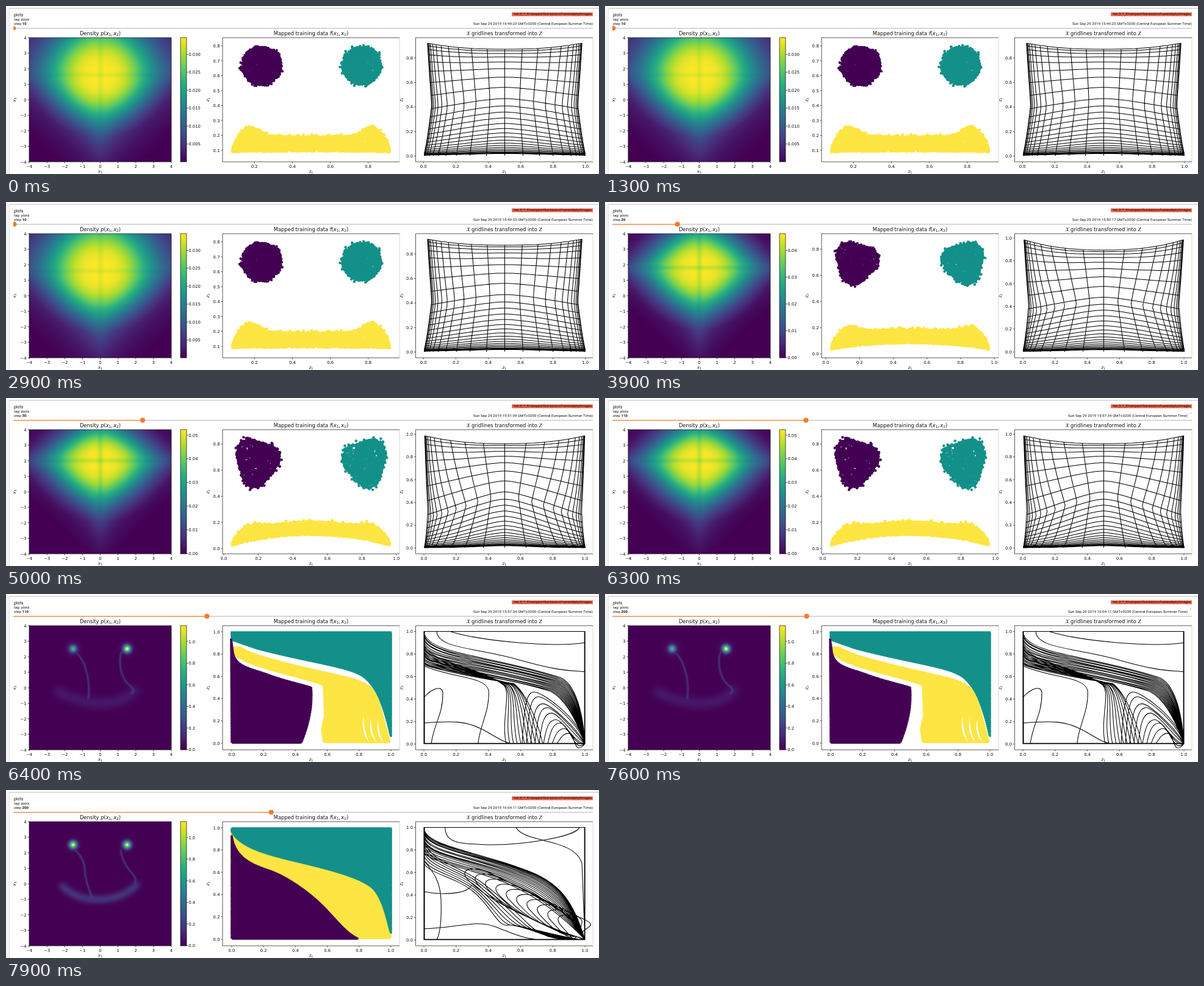
Animation, 972 px wide and 276 px high, one loop 8000 ms. Source, as an HTML page with a canvas:

```html
<!DOCTYPE html>
<html lang="en">
<head>
<meta charset="utf-8">
<title>Training plots</title>
<style>
html, body { margin: 0; width: 100%; height: 100%; overflow: hidden; background: #fff; }
#stage { position: relative; width: 972px; height: 276px; overflow: hidden; }
#stage > *, .plots > * { position: absolute; left: 0; top: 0; }
.plots { width: 972px; height: 276px; }
text { fill: #111; }
.plot { font: 6.85px "DejaVu Sans", sans-serif; }
.title { font-size: 8.3px; }
.script { font: italic 9px "Liberation Serif", serif; }
.ui { font: 6.16px Roboto, sans-serif; }
.axis { fill: none; stroke: #111; stroke-width: .7; }
.grid { fill: none; stroke: #000; stroke-width: 1.05; stroke-linejoin: round; }
</style>
</head>
<body>
<div id="stage">
  <div id="sets"></div>
  <svg class="ui" width="972" height="276">
    <path d="M0 4H5V276H0z" fill="#f4f4f4"/>
    <path d="M5.5 276V4.5" stroke="#e3e3e3" fill="none"/>
    <path d="M5 3.8H972" stroke="#d2d2d2" stroke-width="1.4"/>
    <clipPath id="badge"><rect x="829" y="10.4" width="133" height="6.4"/></clipPath>
    <g clip-path="url(#badge)">
      <rect x="829" y="10" width="133" height="7" fill="#f26a50"/>
      <text x="960" y="14.8" text-anchor="end" font-size="5.5">hw_2_1_2/rampant-fine-bison-of-serendipity/images</text>
      <path d="M831 12.6H960" stroke="#3a1712" stroke-width=".6"/>
    </g>
    <text x="13" y="17" font-size="6.9">plots</text>
    <text x="13" y="24.2">tag: plots</text>
    <text x="13" y="31">step <tspan id="step" font-weight="700">10</tspan></text>
    <text id="date" x="962" y="31" text-anchor="end"></text>
    <circle id="wait" cx="960" cy="25" r=".7" fill="#555"/>
    <path d="M12 36.6H962" stroke="#b9b4b0" stroke-width="1"/>
    <path id="fill" stroke="#f57c27" stroke-width="1.3"/>
    <clipPath id="track"><rect x="12" y="30" width="950" height="14"/></clipPath>
    <circle id="knob" cy="36.5" r="4.1" fill="#f57c27" clip-path="url(#track)"/>
  </svg>
</div>
<script>
const $ = id => document.getElementById(id);
const PURPLE = '#440154', TEAL = '#14908a', YELLOW = '#fde543';
const range = n => Array.from({ length: n }, (_, i) => i);
const clamp = v => Math.min(1, Math.max(0, v));
const mix = (a, b, t) => a + (b - a) * t;

function rng(seed) {
  return () => {
    seed = (seed + 0x6D2B79F5) | 0;
    let t = Math.imul(seed ^ seed >>> 15, 1 | seed);
    t = t + Math.imul(t ^ t >>> 7, 61 | t) ^ t;
    return ((t ^ t >>> 14) >>> 0) / 4294967296;
  };
}

// Viridis, interpolated between key colours
const KEYS = ['440154', '472d7b', '3b528b', '2c728e', '21918c', '28ae80', '5ec962', 'addc30', 'fde725'].map(h => parseInt(h, 16));
function viridis(v) {
  const p = clamp(v) * (KEYS.length - 1), i = Math.min(KEYS.length - 2, Math.floor(p));
  return [16, 8, 0].map(s => mix(KEYS[i] >> s & 255, KEYS[i + 1] >> s & 255, p - i));
}
const rgb = v => `rgb(${viridis(v).map(Math.round)})`;

// A scale holds the pixel of zero, the pixels per unit and the tick step
const scale = (zero, unit, step = .2) => ({ zero, unit, step });
const gridX = scale(685, 264);
const early = { gx: gridX, gy: scale(246.3, -187) };
const late = { bar: scale(255.5, -177.5), x: scale(370, 261), y: scale(245, -183), gx: gridX, gy: scale(246.5, -185) };

const sets = [
  {
    step: 10, time: '15:49:23', at: 0, shown: 0,
    bar: scale(256.1, -5890, .005), x: scale(345, 311), y: scale(261.5, -245, .1),
    gx: scale(684.3, 265.5), gy: scale(246.5, -201.5),
    density: { cy: 1.6, a: 2.9, up: 3.2, down: 3, near: 2.2, far: .95, farUp: 1.5, cross: .04 },
    mesh: { top: 175, lift: 10, k0: 2.2, k1: 2.5, pinch: 10, slim: 4, bend: .35 },
    eyes: { mid: 501, dx: 82, y: 98, rx: 32, ry: 31, tri: .02 },
    smile: { top: 214, bottom: 240, hump: 0, arch: 1, lobe: 18 }
  },
  {
    step: 20, time: '15:50:17', at: 3600, shown: 3800, ...early,
    bar: scale(255.5, -4400, .01), x: scale(362, 276), y: scale(249.5, -215),
    density: { cy: 1.8, a: 2.9, up: 2.5, down: 2.8, near: 1.9, far: .8, farUp: .85, cross: .08 },
    mesh: { top: 167, lift: 17, k0: 2, k1: 2.9, pinch: 9, slim: 0, bend: .45 },
    eyes: { mid: 500, dx: 88, y: 99, rx: 33, ry: 33, tri: .13 },
    smile: { top: 217, bottom: 242, hump: 8, arch: 10, lobe: 11 }
  },
  {
    step: 30, time: '15:51:09', at: 4800, shown: 5000, ...early,
    bar: scale(255.5, -3890, .01), x: scale(357, 283), y: scale(247, -214),
    density: { cy: 2, a: 2.8, up: 2.15, down: 2.7, near: 1.8, far: .8, farUp: .85, cross: .08 },
    mesh: { top: 171, lift: 13, k0: 1.9, k1: 3, pinch: 6, slim: 0, bend: .9 },
    eyes: { mid: 500, dx: 89, y: 105, rx: 34, ry: 38, tri: .14 },
    smile: { top: 225, bottom: 242, hump: 22, arch: 17, lobe: 10 }
  },
  {
    step: 110, time: '15:57:34', at: 6100, shown: 6400, ...late,
    glow: {
      smile: { d: 'M86 160Q112 176 150 180Q195 180 212 158', width: 14, blur: 6, v: .08 },
      streams: ['M113 94Q128 108 131 125Q138 145 135 172', 'M190 94Q186 102 187 115Q188 135 200 148Q214 157 206 163'],
      peaks: [.68, 1.1], halo: .22
    },
    areas: [
      [TEAL, 'M370 63H631V234C621 190 610 155 588 137S500 113 410 89L370 75z'],
      [YELLOW, 'M373 88H384C400 99 440 110 500 124S583 141 598 155S619 215 629 243H521L518 222 523 200 521 150C500 138 392 120 375 98z'],
      [PURPLE, 'M369 75L372 97C377 120 400 122 430 133S490 150 500 154Q504 195 484 244H370z']
    ],
    cracks: 3, curves: bentCurves
  },
  {
    step: 200, time: '16:04:11', at: 7600, shown: 7800, ...late,
    glow: {
      smile: { d: 'M92 158Q115 180 150 180Q190 180 214 156', width: 10, blur: 4, v: .2 },
      streams: ['M113 98Q128 112 129 130Q130 150 141 176', 'M188 98Q190 118 205 135Q216 147 211 153'],
      peaks: [1.08, 1.08], halo: .1
    },
    areas: [
      [YELLOW, 'M370 70H630V243H370z'],
      [PURPLE, 'M370 76C375 110 400 122 430 132S500 170 525 197S560 236 576 244H370z'],
      [TEAL, 'M370 68C385 95 430 106 480 118S590 145 605 165S625 215 631 235V63H370z']
    ],
    curves: loopCurves
  }
];

// Contours go from rounded near the peak to pointed further out
function density(ctx, d) {
  const img = ctx.createImageData(233, 204);
  for (let n = 0; n < 233 * 204; n++) {
    const x = (n % 233 + .5) / 233 * 8 - 4, w = 4 - (Math.floor(n / 233) + .5) / 204 * 8 - d.cy;
    const p = mix(d.near, w > 0 ? d.farUp : d.far, Math.min(1, Math.hypot(x, w) / 4));
    const soft = v => Math.hypot(v, .2) - .12;
    const r = ((soft(x) / d.a) ** p + (soft(w) / (w > 0 ? d.up : d.down)) ** p) ** (1 / p);
    const dip = v => 1 - d.cross * Math.exp(-((v / .15) ** 2));
    const v = Math.max(0, (1 / (1 + r ** 3) - .05) / .95) * dip(x) * dip(w);
    img.data.set([...viridis(v), 255], n * 4);
  }
  ctx.putImageData(img, 38, 52);
}

function glow(ctx, g) {
  ctx.save();
  ctx.fillStyle = rgb(0);
  ctx.fillRect(38, 52, 233, 204);
  ctx.beginPath();
  ctx.rect(38, 52, 233, 204);
  ctx.clip();
  ctx.lineCap = 'round';
  ctx.globalCompositeOperation = 'lighten';
  const line = ({ d, width, blur, v }) => {
    ctx.filter = `blur(${blur}px)`;
    ctx.lineWidth = width;
    ctx.strokeStyle = rgb(v);
    ctx.stroke(new Path2D(d));
  };
  const spot = (x, r, peak) => {
    const grad = ctx.createRadialGradient(x, 90, 0, x, 90, r);
    for (const i of range(11)) grad.addColorStop(i / 10, rgb(peak * Math.exp(-.046 * i * i) * (1 - i / 10)));
    ctx.fillStyle = grad;
    ctx.fillRect(x - r, 90 - r, 2 * r, 2 * r);
  };
  line(g.smile);
  g.streams.forEach(d => line({ d, width: 2.2, blur: .9, v: .22 }));
  ctx.filter = 'none';
  g.peaks.forEach((peak, i) => {
    const x = i ? 198.5 : 110;
    spot(x, 22, g.halo);
    spot(x, 16, peak);
  });
  ctx.restore();
}

function cloud(ctx, color, count, place) {
  ctx.fillStyle = color;
  for (let i = 0; i < count; i++) {
    ctx.beginPath();
    ctx.arc(...place(), 2.2, 0, 7);
    ctx.fill();
  }
}

// Disc with three soft corners and a thin tail of stray points
function eye(ctx, color, side, e, rand) {
  cloud(ctx, color, 1600, () => {
    const a = rand() * 2 * Math.PI, q = Math.sqrt(rand()) + .16 * rand() ** 9;
    const r = q * (1 + e.tri * Math.cos(3 * a + Math.PI / 4));
    return [e.mid + side * (e.dx - e.rx * r * Math.cos(a)), e.y + e.ry * r * Math.sin(a)];
  });
}

function smile(ctx, s, rand) {
  cloud(ctx, YELLOW, 4200, () => {
    const u = rand() * 2 - 1, mid = 1 - u * u;
    const bottom = s.bottom - s.arch * mid;
    const top = s.top - s.hump * mid - s.lobe * Math.exp(-(((Math.abs(u) - .78) / .17) ** 2));
    const depth = (bottom - top) * Math.sqrt(1 - Math.abs(u) ** 10);
    return [500 + 129 * u, bottom - depth * rand() - 5 * rand() ** 14];
  });
}

// Solid area whose rim is a row of dots
function area(ctx, color, d) {
  const path = new Path2D(d);
  ctx.fillStyle = ctx.strokeStyle = color;
  ctx.fill(path);
  ctx.lineCap = 'round';
  ctx.lineWidth = 4.2;
  ctx.setLineDash([0, 3.1]);
  ctx.stroke(path);
  ctx.setLineDash([]);
}

function cracks(ctx, count) {
  ctx.fillStyle = '#fff';
  for (const k of range(count)) {
    const x = 586 + 12 * k, y = 200 + 3 * k;
    ctx.fill(new Path2D(`M${x} ${y}Q${x - 5} ${y + 26} ${x + 9} 243Q${x} ${y + 24} ${x} ${y}z`));
  }
}

// Regular grid squeezed by a sigmoid in both directions, kinked at row 8
function meshCurves(m) {
  const sig = j => 1 / (1 + Math.exp((j - 8.2) * (j < 8.2 ? .42 : .23)));
  const point = (i, j) => {
    const f = sig(j) / sig(0), tri = Math.max(0, 1 - Math.abs(f - .57) / .5);
    const k = mix(m.k0, m.k1, Math.min(1, Math.abs(f - .5) * 2));
    const s = Math.tanh(k * i) / Math.tanh(k), a = Math.abs(s);
    const y = 246 - m.top * f ** (1 + m.bend * a ** 1.5) - m.lift * a ** 2.4 * f ** 3;
    return (817.5 + s * (132 - m.slim * f - m.pinch * tri)).toFixed(1) + ' ' + y.toFixed(1);
  };
  const trace = (n, fn) => 'M' + range(n).map(fn).join('L');
  return [
    ...range(26).map(j => trace(49, t => point(t / 24 - 1, j))),
    ...range(23).map(i => trace(65, t => point(i / 11 - 1, t * .6)))
  ];
}

const BORDER = 'M685 61.5H949V246H685zM686 62V246M685 245.3H949M948.2 62V246';

function bentCurves() {
  const rand = rng(5);
  const band = range(17).map(k => {
    const t = k / 16, w = rand() * 8 - 4;
    return `M685 ${62 + 50 * t}C690 ${98 + 26 * t + w} 790 ${101 + 30 * t - w} ${905 - 12 * t} ${136 + 24 * t}C${935 - 20 * t} ${144 + 28 * t} ${946 - 14 * t} 200 949 246`;
  });
  const falls = range(11).map(k =>
    `M686 ${86 + 3 * k}C700 ${113 + k} 770 ${118 + 2 * k} ${812 + 2 * k} 147C${832 + 2 * k} ${154 + rand() * 8} ${810 + 6 * k} 205 ${820 + 6 * k} 246`);
  const arches = range(9).map(k => {
    const x = 846 + k * 7, y = 160 + k * 8.5 + rand() * 4;
    return `M${x} 246C${x + 4} ${y + 16} ${x + 8} ${y} ${x + 20} ${y}S${938 - k} ${y + 40} 949 246`;
  });
  return [BORDER, ...band, ...falls, ...arches,
    'M706 61.5C708 90 770 88 840 108S925 125 949 128', 'M728 61.5C780 78 900 88 949 80',
    'M685 170C700 153 716 150 716 163C716 200 702 210 697 246', 'M685 212C735 208 755 209 780 222S812 243 830 246',
    'M685 118C730 138 785 135 791 158C794 190 775 220 774 246'];
}

function loopCurves() {
  const rand = rng(6);
  const band = range(18).map(k => {
    const t = (k / 17) ** 1.5, w = rand() * 6;
    return `M685 ${63 + 38 * t}C690 ${92 + 24 * t + w} 770 ${100 + 30 * t} ${845 - 20 * t} ${129 + 26 * t}C${910 - 30 * t} ${150 + 30 * t} ${930 - 10 * t} ${185 + 30 * t} 949 246`;
  });
  const loops = range(10).map(k => {
    const x = 755 + k * 17, y = 131 + k * 8.4;
    return `M949 246C${925 - k} ${238 - k} ${x + 42} ${y + 62} ${x} ${y + 14}C${x - 14} ${y - 6} ${x + 22} ${y - 5} ${x + 44} ${y + 8}S930 ${190 + k * 4} 949 246`;
  });
  const low = range(7).map(k =>
    `M685 ${84 + 6 * k}C694 ${114 + 4 * k} 735 ${124 + 3 * k} 765 ${142 + 4 * k}S${830 - 4 * k} ${195 + 5 * k} ${858 - 6 * k} 222S920 246 949 246`);
  return [BORDER, ...band, ...loops, ...low,
    'M720 61.5C719 88 745 88 790 90C850 91 935 76 940 61.5', 'M836 61.5C850 88 930 78 944 120L949 246',
    'M685 167C715 173 758 171 763 156', 'M685 116C700 134 712 150 713 180S712 235 706 246',
    'M685 228C735 227 770 213 800 224S850 246 880 246'];
}

const label = (x, y, s, anchor) => `<text x="${x}" y="${y}" text-anchor="${anchor}">${s}</text>`;

// Ticks at every multiple of the step that falls between lo and hi
function ticks({ zero, unit, step }, lo, hi, mark) {
  const dec = Math.max(0, -Math.floor(Math.log10(step)));
  let out = '';
  for (let i = -4; i < 12; i++) {
    const p = zero + i * step * unit;
    if (p >= lo - .5 && p <= hi + .05) out += mark(p, (i * step).toFixed(dec).replace('-', '\u2212'));
  }
  return out;
}
const xTicks = (s, x0, x1) => ticks(s, x0, x1, (p, t) =>
  `<path class="axis" d="M${p} 256v2.4"/>` + label(p, 266.3, t, 'middle'));
const yTicks = (s, x) => ticks(s, 52, 256, (p, t) =>
  `<path class="axis" d="M${x} ${p}h-2.4"/>` + label(x - 4.5, p + 2.5, t, 'end'));
const barTicks = s => ticks(s, 52, 256, (p, t) =>
  `<path class="axis" d="M296 ${p}h2.4"/>` + label(299.3, p + 2.5, t, 'start'));

const sub = (v, n) => `<tspan font-style="italic">${v}</tspan><tspan font-size="70%" dy="1.2">${n}</tspan>`;
const call = f => `<tspan font-style="italic">${f}</tspan>(${sub('x', 1)}<tspan dy="-1.2">,</tspan><tspan dx="1.2">${sub('x', 2)}</tspan><tspan dy="-1.2">)</tspan>`;
const script = c => `<tspan class="script">${c}</tspan>`;

function frame(x0, x1, v, title, edge, xs, ys) {
  const mid = (x0 + x1) / 2;
  return `<path class="axis" d="M${x1} 52H${x0}V256H${x1}"/>
    <path class="axis" d="M${x1} 52V256" opacity="${edge}"/>
    <text class="title" x="${mid}" y="47.6" text-anchor="middle">${title}</text>
    <text transform="translate(${x0 - 22} 154) rotate(-90)" text-anchor="middle">${sub(v, 2)}</text>` +
    label(mid, 273.6, sub(v, 1), 'middle') + xTicks(xs, x0, x1) + yTicks(ys, x0);
}

function build(s, index) {
  const box = document.createElement('div');
  box.className = 'plots';
  const canvas = document.createElement('canvas');
  canvas.width = 972;
  canvas.height = 276;
  const ctx = canvas.getContext('2d'), rand = rng(index + 11);
  for (const y of range(204)) {
    ctx.fillStyle = rgb(1 - y / 203);
    ctx.fillRect(286, 52 + y, 10, 1);
  }
  if (s.density) {
    density(ctx, s.density);
    eye(ctx, PURPLE, -1, s.eyes, rand);
    eye(ctx, TEAL, 1, s.eyes, rand);
    smile(ctx, s.smile, rand);
  } else {
    glow(ctx, s.glow);
    s.areas.forEach(a => area(ctx, ...a));
    cracks(ctx, s.cracks || 0);
  }
  const grid = s.curves ? s.curves() : meshCurves(s.mesh);
  box.innerHTML = `<svg class="plot" width="972" height="276">
    ${frame(38, 271, 'x', 'Density ' + call('p'), 1, scale(154.5, 29.1, 1), scale(154, -25.5, 1))}
    <rect class="axis" x="286" y="52" width="10" height="204"/>${barTicks(s.bar)}
    ${frame(355, 645, 'z', 'Mapped training data ' + call('f'), .25, s.x, s.y)}
    <path class="grid" d="${grid.join('')}"/>
    ${frame(671.5, 962, 'z', script('X') + ' gridlines transformed into ' + script('Z'), .25, s.gx, s.gy)}</svg>`;
  box.prepend(canvas);
  $('sets').append(box);
  return box;
}

const boxes = sets.map(build);
const knobX = i => 13.4 + 105.3 * i;
const last = (t, key) => sets.reduce((k, s, i) => t >= s[key] ? i : k, 0);
const start = performance.now();

function draw(now) {
  const t = Math.max(0, now - start) % 8000;
  const cur = last(t, 'at'), seen = last(t, 'shown'), s = sets[cur];
  boxes.forEach((b, i) => b.style.visibility = i === seen ? 'visible' : 'hidden');
  $('step').textContent = s.step;
  $('date').textContent = `Sun Sep 29 2019 ${s.time} GMT+0200 (Central European Summer Time)`;
  $('date').setAttribute('x', cur === seen ? 962 : 955);
  $('wait').style.visibility = cur === seen ? 'hidden' : 'visible';
  const x = cur ? knobX(cur - 1 + clamp((t - s.at) / 80)) : knobX(0);
  $('knob').setAttribute('cx', x);
  $('knob').setAttribute('r', 2.9 + 1.2 * clamp((t - 60) / 180));
  $('fill').setAttribute('d', cur ? `M12 36.6H${x}` : '');
  requestAnimationFrame(draw);
}
draw(start);
</script>
</body>
</html>
```
